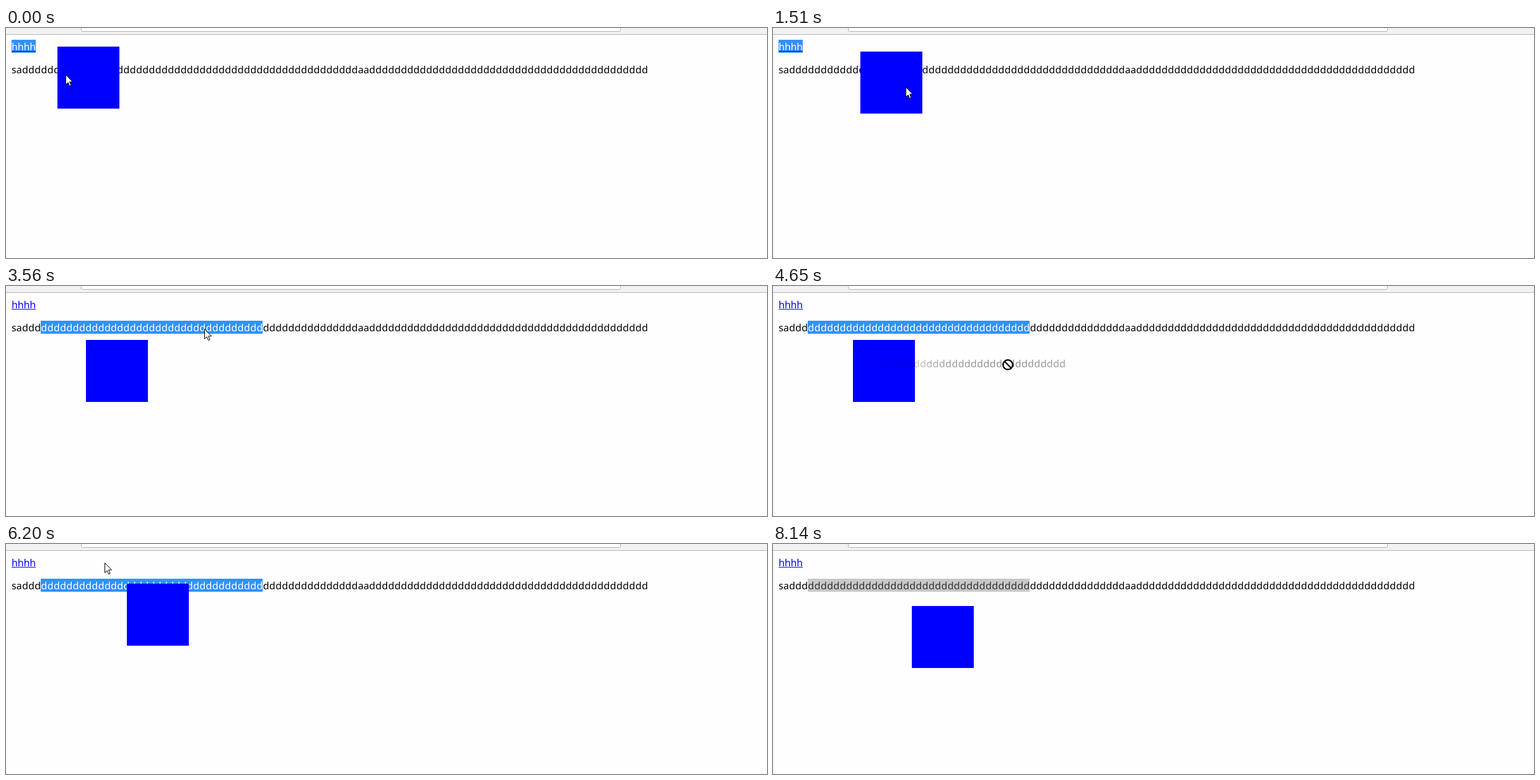
An HTML page that plays this animation: 1228x371 px, repeating every 8240 ms.

```html
<!DOCTYPE html>
<html lang="en">
<head>
<meta charset="utf-8">
<title>Dragging a box</title>
<style>
  html, body { margin: 0; width: 100%; height: 100%; overflow: hidden; background: #fefefe; }
  svg { display: block; }
  text { font: 16px "Noto Sans", "Open Sans", sans-serif; text-rendering: geometricPrecision; white-space: pre; }
  .wide { letter-spacing: .39px; }
  .tight { letter-spacing: -.14px; }
</style>
</head>
<body>
<svg width="1228" height="371" viewBox="0 0 1228 371">
  <defs>
    <text id="line" y="73"></text>
    <clipPath id="range"><rect id="rangeBox" y="56" height="21"/></clipPath>
    <radialGradient id="fade" gradientUnits="userSpaceOnUse" cx="321" cy="69" r="235">
      <stop offset="0" stop-opacity=".44"/>
      <stop offset=".42" stop-opacity=".38"/>
      <stop offset=".7" stop-opacity=".18"/>
      <stop offset="1" stop-opacity="0"/>
    </radialGradient>
  </defs>

  <rect width="1228" height="371" fill="#fefefe"/>
  <rect width="1228" height="10" fill="#f2f2f2"/>
  <rect y="10" width="1228" height="1" fill="#b4b4b4"/>
  <rect y="11" width="1" height="360" fill="#efefef"/>
  <rect x="121.5" y="-10" width="870" height="15.5" rx="2" fill="#fff" stroke="#b0b0b0"/>

  <rect id="linkBack" x="9" y="19" width="39" height="21" fill="#3390ff"/>
  <text id="link" class="tight" x="9" y="36">hhhh</text>
  <rect x="9" y="37" width="39" height="1" fill="#0000ee"/>

  <use href="#line" fill="#000"/>
  <g clip-path="url(#range)">
    <rect id="selBack" x="9" y="56" width="1028" height="21"/>
    <use id="selText" href="#line"/>
  </g>

  <rect id="box" width="100" height="100" fill="#00f"/>
  <text id="ghost" class="wide" x="56.5" y="73" fill="url(#fade)"></text>

  <g id="cursor">
    <path id="arrow" d="M-.5 .5V16.3L3.1 12.9L5.6 18.6L8 17.6L5.6 11.9H10.5Z" fill="#fff" stroke="#000"/>
    <path id="beam" d="M-2.5 -6.5H-.5L.5 -5.5L1.5 -6.5H3.5M.5 -5.5V6.5M-2.5 7.5H-.5L.5 6.5L1.5 7.5H3.5" fill="none" stroke="#000"/>
    <g id="deny" fill="#fff" stroke="#000" stroke-width="2.4">
      <circle r="7.8"/>
      <path d="M-5.5 -5.5L5.5 5.5"/>
    </g>
  </g>
</svg>
<script>
const LOOP = 8240, STEP = 137.4, PITCH = 10.23, SEL_END = 414;
const $ = id => document.getElementById(id);
const set = (id, attrs) => { for (const k in attrs) $(id).setAttribute(k, attrs[k]); };
const show = (id, on) => set(id, { visibility: on ? 'visible' : 'hidden' });
const move = (id, x, y) => set(id, { transform: `translate(${x} ${y})` });

// Turning points of the mouse: [step, x, y]
const mouse = [
  [0, 97, 75], [1, 116, 56], [3, 116, 56],
  [5, 196, 148], [7, 196, 148], [9, 100, 86], [10, 133, 33], [11, 215, 95], [12, 265, 100], [14, 164, 137],
  [15, 160, 89], [16, 424, 113], [19, 414, 69], [23, 57, 68], [26, 321, 69], [34, 379, 127],
  [38, 186, 107], [41, 281, 202], [42, 367, 210], [43, 528, 244], [45, 160, 30], [47, 141, 70], [48, 284, 121],
  [49, 284, 121], [50, 281, 120], [51, 1032, 283], [54, 1130, 400]
];

// The box trails the mouse by half a step while it is held
const LAG = .5;
const drags = [
  { from: 3, to: 14.5, grabX: 33, grabY: 26 },
  { from: 38, to: 50, grabX: 57, grabY: 20 }
];

function mouseAt(n) {
  const i = mouse.findIndex(p => p[0] > n);
  if (i < 0) return mouse[mouse.length - 1].slice(1);
  const [a, b] = [mouse[i - 1], mouse[i]];
  const k = (n - a[0]) / (b[0] - a[0]);
  return [1, 2].map(j => Math.round(a[j] + (b[j] - a[j]) * k));
}

function boxAt(n) {
  const drag = n < drags[1].from ? drags[0] : drags[1];
  const [x, y] = mouseAt(Math.min(Math.max(n - LAG, drag.from), drag.to));
  return [x - drag.grabX, y - drag.grabY];
}

function addRun(x, str, cls) {
  const run = document.createElementNS('http://www.w3.org/2000/svg', 'tspan');
  run.setAttribute('x', x);
  if (cls) run.setAttribute('class', cls);
  run.textContent = str;
  $('line').appendChild(run);
}
addRun(9, 'sa');
addRun(25.9, 'd'.repeat(53), 'wide');
addRun(568, 'aa');
addRun(586, 'd'.repeat(44), 'wide');
$('ghost').textContent = 'd'.repeat(35);

function draw(time) {
  // The screen refreshes in even steps
  const n = Math.floor((time + 25) / STEP);
  const [mx, my] = mouseAt(n);

  const linked = n < 18;
  show('linkBack', linked);
  set('link', { fill: linked ? '#fff' : '#0000ee' });

  // Text selection grows leftwards letter by letter
  const reach = n < 20 ? SEL_END : n < 23 ? mx : 56;
  const width = Math.round(Math.round((SEL_END - reach) / PITCH) * PITCH);
  set('rangeBox', { x: SEL_END - width, width });
  const idle = time >= 8140;
  set('selBack', { fill: idle ? '#c8c8c8' : '#3390ff' });
  set('selText', { fill: idle ? '#323232' : '#fff' });

  move('box', ...boxAt(n));

  const beam = n >= 18 && n < 24;
  const deny = n >= 27 && n < 36;
  show('ghost', deny);
  move('ghost', mx - 321, my - 69);
  show('arrow', !beam && !deny);
  show('beam', beam);
  show('deny', deny);
  move('cursor', mx, my);
}

const start = performance.now();
function frame() {
  draw((performance.now() - start) % LOOP);
  requestAnimationFrame(frame);
}
frame();
</script>
</body>
</html>
```
